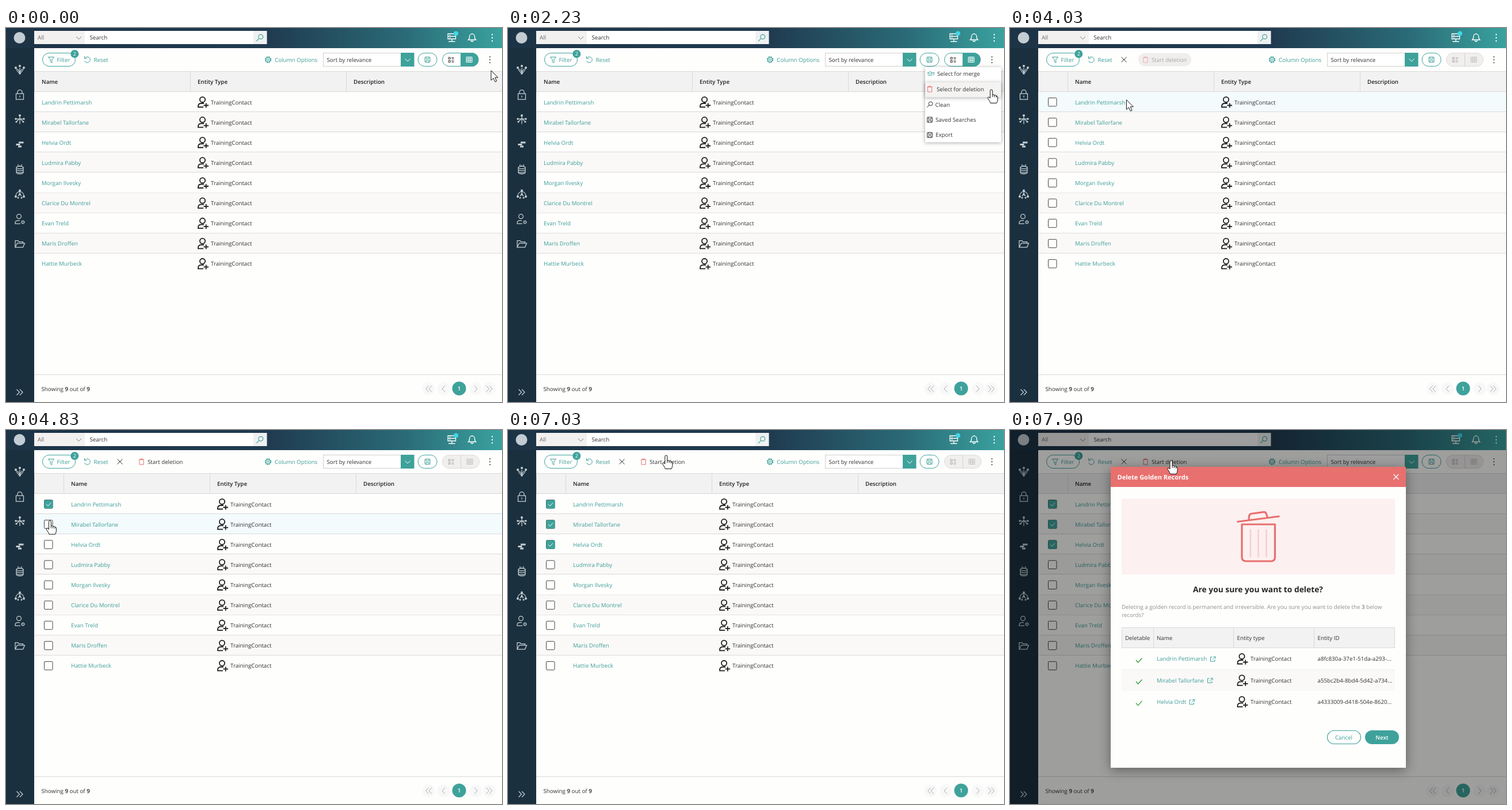
These frames come from a looping animation (862x650 px, 8000 ms). An HTML page:

```html
<!DOCTYPE html>
<html lang="en">
<head>
<meta charset="utf-8">
<title>Delete golden records</title>
<style>
html, body { margin: 0; width: 100%; height: 100%; overflow: hidden; background: #fefefd; }
svg { display: block; width: 100vw; height: 100vh; }
text { font: 9.75px "Open Sans", "Noto Sans", sans-serif; fill: #333; text-rendering: geometricPrecision; white-space: pre; }
.teal { fill: #3f9e98; }
.bold { font-weight: 600; fill: #222; }
.medium { font-weight: 500; }
.white { fill: #fff; }
.mid { text-anchor: middle; }
.line { fill: none; stroke: #3ea29b; }
.rule { fill: none; stroke: #d9d9d9; }
.side { fill: none; stroke: #c6d0d5; stroke-width: 1.25; }
.person { fill: none; stroke: #1d1d1d; stroke-width: 1.8; }
.dark { fill: none; stroke: #333; }
.gray { fill: none; stroke: #aaa; }
.red { fill: none; stroke: #e8706e; }
#menu > rect { filter: drop-shadow(0 1px 3px #0005); }
#panel { filter: drop-shadow(0 4px 10px #0006); }
</style>
</head>
<body>
<svg viewBox="0 0 862 650" preserveAspectRatio="none">
  <defs>
    <linearGradient id="bar">
      <stop offset="0" stop-color="#1d3346"/>
      <stop offset=".53" stop-color="#203b50"/>
      <stop offset=".8" stop-color="#2a6a76"/>
      <stop offset="1" stop-color="#3aa29f"/>
    </linearGradient>
    <g id="person" class="person">
      <circle cx="8.5" cy="5.4" r="4.6"/>
      <path d="M10 18.5H1V17q0-5 5.5-5h4.5M14.7 11.5v8M10.5 15.5h8.5"/>
    </g>
    <path id="bin" d="M-4.5-3.5h9M-1.8-3.5v-1.4h3.6v1.4M-3.6-3.5V5h7.2v-8.5"/>
    <g id="disk"><rect x="-4.5" y="-4.5" width="9" height="9" rx=".8"/><path d="M-2.5-4.5v3.3h5v-3.3M-2.5 4.5V1.3h5v3.2"/></g>
    <g id="lens"><circle cx="1.5" cy="-1.5" r="3.4"/><path d="M-1 1l-4 4"/></g>
    <g id="list"><path d="M-4.5-4h3.2v3h-3.2zM-4.5 1.5h3.2v3h-3.2zM1-3.5h4M1-1.3h4M1 2h4M1 4.2h4"/></g>
    <path id="grid" d="M-5-4.5H5v9H-5zM-5-1.5H5M-5 1.5H5M-1.7-4.5v9M1.7-4.5v9"/>
    <path id="cross" d="M-4.5-4.5l9 9M4.5-4.5l-9 9"/>
    <path id="out" d="M-1-3.5h-3v7.5h7.5V1M1-4h3.5v3.5M4.5-4L-.5 1"/>
  </defs>

  <rect width="862" height="650" fill="#fefefd"/>
  <g id="tables"></g>

  <!-- toolbar -->
  <g>
    <rect class="line" x="63.5" y="43.5" width="57" height="23" rx="11.5"/>
    <path class="line" d="M73.500 50.500h10l-3.700 4.500v5.500l-2.600-1.700v-3.800z"/>
    <text class="teal" x="88.500" y="59">Filter</text>
    <circle cx="119.300" cy="45" r="7" fill="#3ea29b"/>
    <text class="white mid" x="119.300" y="48.300" style="font-size:9px">2</text>
    <path class="line" d="M137 52.500a5 5 0 1 1-.4 4.500M136.500 49v4h4"/>
    <text class="teal" x="152.500" y="58.700">Reset</text>
    <circle class="line" cx="455.500" cy="55" r="4.900" stroke-width="1.6" stroke-dasharray="2.6 1.250"/>
    <circle class="line" cx="455.500" cy="55" r="3.900"/><circle class="line" cx="455.500" cy="55" r="1.700"/>
    <text class="teal" x="467" y="58.700">Column Options</text>
    <rect x="551.500" y="43.500" width="157" height="23" fill="#fff" stroke="#d0d0d0"/>
    <text x="557.500" y="59.200">Sort by relevance</text>
    <rect x="686" y="43" width="23.500" height="24" fill="#3ea29b"/>
    <path d="M693.500 53.500l4.500 4.500 4.500-4.500" fill="none" stroke="#fff"/>
    <rect class="line" x="716" y="43.500" width="33" height="23" rx="11.500"/>
    <use href="#disk" class="line" x="732.500" y="55"/>
  </g>
  <g id="browseTools">
    <path d="M790 43h19.500a12 12 0 0 1 0 24H790z" fill="#3ea29b"/>
    <rect class="line" x="758.500" y="43.500" width="62" height="23" rx="11.500"/>
    <use href="#list" class="dark" x="773.500" y="55"/>
    <use href="#grid" x="805" y="55" fill="none" stroke="#fff"/>
  </g>
  <g id="selectTools">
    <rect x="758.500" y="43.500" width="64" height="23" rx="11.500" fill="#f1efee" stroke="#dddbd9"/>
    <path d="M790.500 43.500v23" stroke="#d5d3d1"/>
    <use href="#list" class="gray" x="773.500" y="55"/>
    <use href="#grid" x="806" y="55" fill="none" stroke="#c4c2c0"/>
    <use href="#cross" class="dark" x="198" y="55"/>
    <rect id="disabledPill" x="223" y="43.500" width="92" height="23" rx="11.500" fill="#f0eeed"/>
    <use id="startBin" href="#bin" class="red" x="235.500" y="55"/>
    <text id="startLabel" x="246" y="59.300">Start deletion</text>
  </g>
  <circle id="halo" cx="840.500" cy="55" r="12.500"/>
  <path d="M841 50.300v.01M841 55.300v.01M841 60.300v.01" stroke="#333" stroke-width="2" stroke-linecap="round"/>

  <!-- footer -->
  <path class="rule" d="M49 602.500h813"/>
  <text x="61.500" y="631">Showing <tspan class="bold">9</tspan> out of <tspan class="bold">9</tspan></text>
  <g fill="#f9f8f8"><circle cx="734.500" cy="627" r="11"/><circle cx="760.500" cy="627" r="11"/><circle cx="816.500" cy="627" r="11"/><circle cx="840" cy="627" r="11"/></g>
  <path class="gray" d="M734.500 621.500l-5 5.500 5 5.500M740 621.500l-5 5.500 5 5.500M763 621.500l-5 5.500 5 5.500M814 621.500l5 5.500-5 5.500M834.500 621.500l5 5.500-5 5.500M840 621.500l5 5.500-5 5.500"/>
  <circle cx="787.500" cy="626.500" r="12" fill="#3ea29b"/>
  <text class="white bold mid" x="787.500" y="630" style="fill:#fff">1</text>

  <!-- header -->
  <rect width="862" height="35" fill="url(#bar)"/>
  <rect x="49" y="5" width="88" height="23" fill="#f3f1f0"/>
  <rect x="137" y="5" width="293" height="23" fill="#fff"/>
  <rect x="430" y="5" width="23.500" height="23" fill="#eff1f1"/>
  <text x="55" y="20" style="fill:#666">All</text>
  <path d="M122 15l4.500 4.500 4.500-4.500" fill="none" stroke="#777"/>
  <text x="145.500" y="20.300">Search</text>
  <use href="#lens" class="line" transform="translate(441 17) scale(1.15)"/>
  <g fill="none" stroke="#fff" stroke-width="1.3">
    <path d="M768 10h13.500v4.500H768zM768 14.500h13.500V19H768zM774.800 19v4M769 23.500h11.500M770.500 12.300h2M770.500 16.800h2"/>
    <path d="M803.500 20.500q2-1.500 2-5.500a4.500 4.700 0 0 1 9 0q0 4 2 5.500zM808 21.500a2 2 0 0 0 4 0M810 10.500V9"/>
    <path d="M845 11.500v.01M845 17v.01M845 22.500v.01" stroke-width="2.400" stroke-linecap="round"/>
  </g>
  <circle cx="782" cy="9.500" r="4" fill="#41d6e6"/>

  <!-- sidebar -->
  <rect y="35" width="49" height="615" fill="#1b303e"/>
  <circle cx="23.500" cy="17" r="10" fill="#c3ccd3"/>
  <g class="side">
    <path d="M17 68q1 7 7 11 6-4 7-11M24 69v10M20 71l4 6 4-6"/>
    <g fill="#c6d0d5" stroke="none"><circle cx="17" cy="69" r="2"/><circle cx="31" cy="69" r="2"/><circle cx="24" cy="66" r="2"/><circle cx="24" cy="79" r="1.800"/></g>
    <path d="M17.500 114h13v10h-13zM20 114v-2.500a4 4 0 0 1 8 0v2.500M24 117.500v3"/>
    <path d="M24 153v14M16 158h16M24 157l-6 6M24 157l6 6"/>
    <g fill="#c6d0d5" stroke="none"><circle cx="24" cy="152" r="2"/><circle cx="17" cy="158" r="1.700"/><circle cx="31" cy="158" r="1.700"/><circle cx="18" cy="163" r="1.600"/><circle cx="30" cy="163" r="1.600"/></g>
    <path d="M22 199h8.500M17.500 202.500h7M21 206h6" stroke-width="2.800"/>
    <ellipse cx="24" cy="242.500" rx="6" ry="2.200"/>
    <path d="M18 242.500v8.500q0 2.500 6 2.500t6-2.500v-8.500M18 246q1 2 6 2t6-2M18 249.500q1 2 6 2t6-2M21 241v-4M24 241v-2.500M27 241v-4"/>
    <path d="M16.500 293q1-8 7.500-9 6.500 1 7.500 9M24 284v4M21 292l3-3 3 3"/>
    <g fill="#c6d0d5" stroke="none"><circle cx="24" cy="282.500" r="2"/><circle cx="17" cy="293" r="2"/><circle cx="31" cy="293" r="2"/><circle cx="24" cy="289" r="1.800"/><circle cx="21" cy="295" r="1.500"/><circle cx="27" cy="295" r="1.500"/></g>
    <circle cx="22.500" cy="327.500" r="3.900"/>
    <path d="M25 340h-9v-1.500q0-4 5-4h3"/>
    <circle cx="29.500" cy="337.500" r="2.200" stroke-width="2" stroke-dasharray="1.300 .5"/>
    <path d="M16 381v-11.500h5l1.500 2h7v2.500M16 381l3.500-7H32.500l-3 7z"/>
    <path d="M18.500 628l5 5-5 5M24 628l5 5-5 5"/>
  </g>

  <g id="menu">
    <rect x="725" y="68" width="132" height="130.500" fill="#fff"/>
    <rect id="menuHover" x="725" width="132" height="26" fill="#f4f3f2"/>
    <path class="line" d="M729 78l4.500-2 4.500 2-4.500 2zM729 81l4.500 2 4.500-2M740 82v-5M739 78.500l1-1.500 1 1.500"/>
    <use href="#bin" class="red" x="733" y="106"/>
    <use href="#lens" class="dark" x="733" y="133"/>
    <use href="#disk" class="dark" x="733" y="159.500"/>
    <use href="#disk" class="dark" x="733" y="186"/>
    <text x="746" y="83.300">Select for merge</text>
    <text x="745" y="109.700">Select for deletion</text>
    <text x="742.500" y="136.500">Clean</text>
    <text x="743" y="162.500">Saved Searches</text>
    <text x="743" y="188.700">Export</text>
  </g>

  <g id="dialog">
    <rect width="862" height="650" fill="#000" opacity=".38"/>
    <rect id="panel" x="175" width="513" fill="#fefefd"/>
    <g id="top">
      <rect x="175" y="80" width="513" height="35" fill="#e8706e"/>
      <text x="186.500" y="101.500" style="font-size:11px;font-weight:700;fill:#fff">Delete Golden Records</text>
      <use href="#cross" x="671" y="97.500" fill="none" stroke="#fff" stroke-width="1.200"/>
      <rect x="194" y="135.500" width="475" height="131.500" fill="#fdf0f0"/>
      <g class="red" stroke-width="3.200" stroke-linejoin="round">
        <path d="M394.500 175.500l74-9.500M415 172l.5-6q.5-4 4-4.500l21-2.800q4-.5 5 3l2 6"/>
        <path d="M403 180h57.500v57q0 7-7 7H410q-7 0-7-7z"/>
        <path d="M418 188.500V237M431.500 188.500V237M445.500 188.500V237" stroke="#f7cfcf" stroke-width="2.600"/>
      </g>
      <text class="mid" x="431" y="297.700" style="font-size:13.800px;font-weight:700;fill:#262626">Are you sure you want to delete?</text>
    </g>
    <g id="loading">
      <g id="spinner" transform="translate(431.500 389.500)" stroke="#3b9c99" stroke-width="5.600"></g>
      <text class="mid" x="425" y="472" style="font-size:8.300px;fill:#666">Fetching data</text>
    </g>
    <g id="summary"></g>
    <g id="buttons">
      <rect class="line" x="551.500" y="506.500" width="58" height="23" rx="11.500" stroke-width="1.200"/>
      <text class="teal mid" x="580" y="522">Cancel</text>
      <rect x="617" y="506" width="59" height="24" rx="12" fill="#3ea29b"/>
      <text class="mid" x="646.500" y="522" style="font-weight:600;fill:#fff">Next</text>
    </g>
  </g>

  <g id="cursor" fill="#fff" stroke="#111" stroke-linejoin="round">
    <path id="arrow" d="M0 0V17l4-3.800 3 6.300 2.700-1.200-2.900-6.200H12z"/>
    <g id="hand">
      <path d="M-2 14V2a2 2 0 0 1 4 0V9q3-1 3.300 1 3-1 3.200 1 2.500-.5 2.500 2v4.500q0 2.500-1.800 6H-1.500q-.5-2.500-3.500-6.500-2.500-3-.5-4 1.500-.5 3.500 2z"/>
      <path d="M2 9v4M5.300 10v3.300M8.500 11v2.800" fill="none"/>
    </g>
  </g>
</svg>

<script>
const $ = id => document.getElementById(id);
const LOOP = 8000, PITCH = 35.12, TOP = 111;
const OPEN = 1300, SELECT_MODE = 2660, DIALOG = 7430, LOADED = 7890;
const CHECKED_AT = [4530, 5160, 5860];
const names = ['Landrin Pettimarsh', 'Mirabel Tallorfane', 'Helvia Ordt', 'Ludmira Pabby', 'Morgan Ilvesky',
  'Clarice Du Montrel', 'Evan Treld', 'Maris Droffen', 'Hattie Murbeck'];
const ids = ['a8fc830a-37e1-51da-a293-...', 'a55bc2b4-8bd4-5d42-a734...', 'a4333009-d418-504e-8620...'];

// Cursor stops: time, x, y
const stops = [[200, 843, 74], [900, 843, 46], [1520, 843, 46], [2230, 840, 107], [3270, 840.5, 107],
  [3360, 840, 109], [3470, 840, 109], [4230, 72, 128], [4560, 72, 128], [4860, 76.5, 158.5],
  [5190, 76.5, 158.5], [5700, 70, 202], [6310, 70, 202], [6880, 265, 27], [7130, 280, 53]];

const text = (x, y, s, cls = '') => `<text x="${x}" y="${y}" class="${cls}">${s}</text>`;
const rect = (x, y, w, h, rest) => `<rect x="${x}" y="${y}" width="${w}" height="${h}" ${rest}/>`;
const rule = d => `<path class="rule" d="${d}"/>`;
const person = (x, y) => `<use href="#person" x="${x}" y="${y}"/>`;
const stripe = i => i % 2 ? '#faf9f8' : '#fefefd';

function table(id, [nameX, typeX, noteX], boxes) {
  const rows = names.map((name, i) => {
    const y = TOP + i * PITCH, mid = y + 18;
    const box = boxes ? rect(66.5, mid - 7.5, 14.5, 14.5, 'rx="1.5" fill="#fff" stroke="#444"') +
      (i < 3 ? `<g class="check">${rect(66.500, mid - 7.5, 15, 15, 'rx="1.5"')}
        <path d="M70 ${mid}l3 3 5-5.500" fill="none" stroke="#fff"/></g>` : '') : '';
    return rect(49, y, 813, PITCH, `class="row" fill="${stripe(i)}"`) +
      (i < 8 ? rule(`M50 ${Math.round(y + PITCH) - .5}H862`) : '') + box +
      text(nameX, mid + 3.5, name, 'teal') + person(typeX, mid - 10) +
      text(typeX + 23, mid + 3.5, 'TrainingContact');
  }).join('');
  const dividers = [nameX, typeX, noteX].filter(x => x > 62).map(x => `M${x - 12.5} 76v34`).join('');
  return `<g id="${id}">${rows}${rect(49, 76, 813, 34.5, 'fill="#f3f2f2"')}
    ${rule('M49 75.500H862M49 110.500H862M49.500 76v34' + dividers)}
    ${text(nameX, 97, 'Name', 'bold')}${text(typeX, 97, 'Entity Type', 'bold')}${text(noteX, 97, 'Description', 'bold')}</g>`;
}
$('tables').innerHTML = table('browse', [62, 333, 604]) + table('select', [113, 367, 621], true);

$('summary').innerHTML =
  `<g opacity=".55">${text(194, 311, 'Deleting a golden record is permanent and irreversible. Are you sure you want to delete the <tspan class="bold">3</tspan> below')}
  ${text(194, 325, 'records?')}</g>` +
  rect(194.5, 343.5, 474, 35, 'fill="#f3f2f2" stroke="#d9d9d9"') + rule('M249.500 343v35M388.500 343v35M528.500 343v35') +
  ['Deletable', 'Name', 'Entity type', 'Entity ID'].map((s, i) => text([200, 255, 394.5, 534.5][i], 364.7, s, 'medium')).join('') +
  ids.map((id, i) => {
    const y = 379 + i * 37.3;
    return rect(194, y, 475, 37.3, `fill="${stripe(i)}"`) + (i < 2 ? rule(`M194 ${Math.round(y + 37.3) + .5}h475`) : '') +
      `<path d="M219 ${y + 21}l3.500 4 7-7.500" fill="none" stroke="#2c9a3c" stroke-width="1.300"/>` +
      text(255, y + 22.3, names[i], 'teal') +
      `<use href="#out" class="line" x="${[352.5, 347.5, 316][i]}" y="${y + 19}"/>` +
      person(394.5, y + 9) + text(418, y + 22.3, 'TrainingContact') + text(534.5, y + 22.3, id);
  }).join('');

$('spinner').innerHTML = Array.from({ length: 8 }, (_, k) =>
  `<path d="M0-17V-41" stroke-linecap="round" transform="rotate(${k * 45})"/>`).join('');

const rows = [...$('select').querySelectorAll('.row')];
const checks = [...$('select').querySelectorAll('.check')];
const spokes = [...$('spinner').children];
const clamp = v => Math.max(0, Math.min(1, v));
const ramp = (t, start, length) => clamp((t - start) / length);
const show = (id, on) => { $(id).style.display = on ? '' : 'none'; };

function cursorAt(t) {
  const i = stops.findIndex(s => s[0] > t);
  if (i === 0) return stops[0].slice(1);
  if (i < 0) return stops.at(-1).slice(1);
  const [t0, x0, y0] = stops[i - 1], [t1, x1, y1] = stops[i];
  const u = (t - t0) / (t1 - t0), k = u * u * (3 - 2 * u);
  return [x0 + (x1 - x0) * k, y0 + (y1 - y0) * k];
}

function render(t) {
  const [x, y] = cursorAt(t);
  const selecting = t >= SELECT_MODE, armed = t >= CHECKED_AT[0], loaded = t >= LOADED;

  show('browse', !selecting);
  show('browseTools', !selecting);
  show('select', selecting);
  show('selectTools', selecting);
  show('disabledPill', !armed);
  $('startLabel').style.fill = armed ? '#333' : '#a8a6a5';
  $('startBin').style.opacity = armed ? 1 : .5;

  const overKebab = !selecting && y < 67;
  show('halo', overKebab);
  $('halo').setAttribute('fill', t >= 1100 && t < OPEN ? '#dddcdb' : '#ecebea');

  show('menu', t >= OPEN && t < 2830);
  $('menu').style.opacity = ramp(t, OPEN, 130) * (1 - ramp(t, SELECT_MODE, 150));
  const item = Math.floor((y - 67) / 26.3);
  show('menuHover', item >= 0);
  $('menuHover').setAttribute('y', 68 + item * 26.3);

  const hovered = t > 3500 && y >= TOP ? Math.floor((y - TOP) / PITCH) : -1;
  rows.forEach((row, i) => row.setAttribute('fill', i === hovered ? '#f3fbfc' : stripe(i)));
  checks.forEach((check, i) => {
    check.style.opacity = ramp(t, CHECKED_AT[i] - 30, 140);
    check.setAttribute('fill', i === hovered && x < 83 ? '#2c6f6d' : '#3ea29b');
  });

  show('dialog', t >= DIALOG);
  show('loading', !loaded);
  show('summary', loaded);
  const grow = loaded ? 16 : 0;
  $('panel').setAttribute('y', 80 - grow);
  $('panel').setAttribute('height', 491 + 2 * grow);
  $('top').setAttribute('transform', `translate(0 ${-grow})`);
  $('buttons').setAttribute('transform', `translate(0 ${grow})`);
  const turn = (t - DIALOG) / 1000 + 7.02 / 8;
  spokes.forEach((spoke, k) => { spoke.style.opacity = 1 - (turn - k / 8 + 1) % 1; });

  const pointing = overKebab || (t > OPEN && t < 2800) || (hovered >= 0 && x < 200) || t > 6980;
  show('hand', pointing);
  show('arrow', !pointing);
  $('cursor').setAttribute('transform', `translate(${x} ${y})`);
}

const start = performance.now();
function tick() {
  render((performance.now() - start) % LOOP);
  requestAnimationFrame(tick);
}
tick();
</script>
</body>
</html>
```
